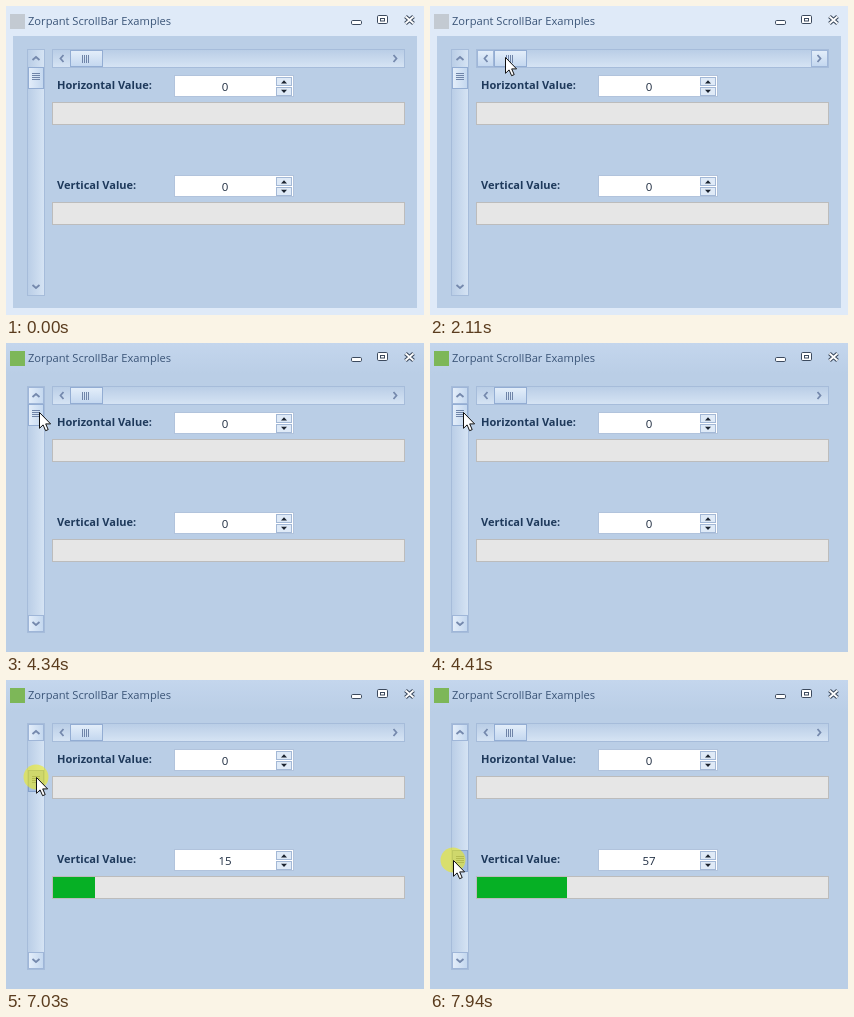
An HTML page for the animation above (8 s loop, 418x309 px).

```html
<!DOCTYPE html>
<html lang="en">
<head>
<meta charset="utf-8">
<title>ScrollBar Examples</title>
<style>
  html, body { margin: 0; width: 100%; height: 100%; overflow: hidden; background: #bacee6; }
  svg { display: block; width: 418px; height: 309px; font-family: "Open Sans", "Noto Sans", sans-serif; }
  .title { font-size: 11.15px; fill: #3b5578; }
  .label { font-size: 11.05px; font-weight: 700; fill: #1e395b; }
  .value { font-size: 11.5px; fill: #1e2c40; text-anchor: middle; }
  .chevron { fill: none; stroke: #7589ad; stroke-width: 1.8; }
  .button { stroke: #9fb6d8; visibility: hidden; }
  .hover .button { visibility: visible; }
  .thumb { stroke: #93add3; }
  .grip { stroke: #6f84a8; fill: none; }
  .track { stroke: #a6bcda; }
  .bar { fill: #e6e6e6; stroke: #bcbcbc; }
  .fill { fill: #06b025; }
  .logo { fill: #c3cad2; }
  .active .logo { fill: #7db758; }
  .frame { fill: #dfeaf8; }
  .active .frame { fill: url(#caption); }
  .crisp { shape-rendering: crispEdges; }
  .pressed .thumb { fill: #a5bfe1; stroke: #86a2cb; }
</style>
</head>
<body>
<svg id="stage" viewBox="0 0 418 309">
  <defs>
    <linearGradient id="caption" x2="0" y2="1">
      <stop stop-color="#c4d6ed"/><stop offset=".1" stop-color="#bacee6"/>
    </linearGradient>
    <linearGradient id="trackH" x2="0" y2="1">
      <stop stop-color="#b9cde6"/><stop offset="1" stop-color="#d6e4f4"/>
    </linearGradient>
    <linearGradient id="trackV">
      <stop stop-color="#b9cde6"/><stop offset="1" stop-color="#d6e4f4"/>
    </linearGradient>
    <linearGradient id="knobH" x2="0" y2="1">
      <stop stop-color="#e4eefa"/><stop offset="1" stop-color="#c3d7ef"/>
    </linearGradient>
    <linearGradient id="knobV">
      <stop stop-color="#e4eefa"/><stop offset="1" stop-color="#c3d7ef"/>
    </linearGradient>
    <g id="spin">
      <path class="crisp" d="M168.5 69.5h119v21h-119z" fill="#fff" stroke="#b1c3dc"/>
      <path class="crisp" d="M270.5 71.5h15v8h-15zM270.5 81.5h15v8h-15z" fill="#dfeaf7" stroke="#a3b8d6"/>
      <path d="M275 77.5h6l-3-3.2zM275 83.8h6l-3 3.2z" fill="#1c2430"/>
    </g>
  </defs>

  <rect class="frame" width="418" height="309"/>
  <rect x="7" y="30" width="404" height="272" fill="#bacee6"/>
  <rect class="logo" x="4" y="8" width="15" height="15"/>
  <text class="title" x="22" y="19">Zorpant ScrollBar Examples</text>

  <g fill="#fff" stroke="#3c4a5e">
    <rect x="345.5" y="14.5" width="10" height="4" rx="1.2"/>
    <rect x="371.5" y="9.5" width="10" height="8" rx="1.2"/>
    <rect x="374.5" y="12.5" width="4" height="2.5"/>
    <path d="M399.5 10.5l8 7m0-7l-8 7" stroke-width="4"/>
    <path d="M399.5 10.5l8 7m0-7l-8 7" stroke="#fff" stroke-width="1.8"/>
  </g>

  <g id="horizontal">
    <g class="crisp">
      <rect class="track" x="46.5" y="43.5" width="352" height="18" fill="url(#trackH)"/>
      <path class="button" d="M47.5 44.5h16v16h-16zM381.5 44.5h16v16h-16z" fill="url(#knobH)"/>
      <rect class="thumb" x="64.5" y="44.5" width="32" height="16" rx="1" fill="url(#knobH)"/>
      <path class="grip" d="M76.5 49v8m2-8v8m2-8v8m2-8v8"/>
    </g>
    <path class="chevron" d="M57.5 49l-3 3.5 3 3.5M387.5 49l3 3.5-3 3.5"/>
  </g>

  <g id="vertical">
    <g class="crisp">
      <rect class="track" x="21.5" y="43.5" width="17" height="246" fill="url(#trackV)"/>
      <path class="button" d="M22.5 44.5h15v16h-15zM22.5 272.5h15v16h-15z" fill="url(#knobV)"/>
      <g id="thumb">
        <rect class="thumb" x="22.5" y="61.5" width="15" height="21" rx="1" fill="url(#knobV)"/>
        <path class="grip" d="M26 67.5h8m-8 2h8m-8 2h8m-8 2h8"/>
      </g>
    </g>
    <path class="chevron" d="M26.5 54l3.5-3 3.5 3M26.5 279l3.5 3 3.5-3"/>
  </g>

  <text class="label" x="51" y="83">Horizontal Value:</text>
  <text class="label" x="51" y="183">Vertical Value:</text>
  <use href="#spin"/>
  <use href="#spin" y="100"/>
  <text class="value" x="219" y="85">0</text>
  <text class="value" id="value" x="219" y="185">0</text>
  <g class="crisp">
    <path class="bar" d="M46.5 96.5h352v22h-352zM46.5 196.5h352v22h-352z"/>
    <rect class="fill" id="fill" x="47" y="197" width="0" height="21"/>
  </g>

  <g id="cursor">
    <circle id="halo" r="12.5" fill="#f5f000" opacity=".52"/>
    <path d="M.5.5v15.8l3.6-3.4 2.5 5.8 2.6-1.1-2.5-5.7h4.9z" fill="#fff" stroke="#111"/>
  </g>
</svg>
<script>
  const $ = id => document.getElementById(id);
  const LOOP = 8000, STEP = 70, ACTIVATE = 4340, PRESS = 6610;

  // time, pointer x, pointer y, vertical value
  const path = [
    [330, 392, 306, 0], [1030, 125, 52, 0], [1100, 110, 46, 0], [1240, 92, 41, 0],
    [1380, 80, 49, 0], [2040, 80, 49, 0], [2670, 33, 69, 0], [6540, 33, 69, 0],
    [PRESS, 33, 71, 1], [7380, 28, 119, 26], [7590, 28, 119, 26], [7940, 23, 180, 57]
  ];

  function sample(t) {
    const i = path.findIndex(p => p[0] > t);
    if (i < 0) return path[path.length - 1];
    if (i === 0) return path[0];
    const a = path[i - 1], b = path[i], k = (t - a[0]) / (b[0] - a[0]);
    return a.map((v, j) => Math.round(v + (b[j] - v) * k));
  }

  // The picture advances in steps, restarting with each burst of movement.
  function snap(t) {
    const base = t < 2110 ? 330 : t < PRESS ? 2110 : PRESS;
    return base + Math.floor((t - base) / STEP) * STEP;
  }

  function draw(t) {
    const time = snap(t), [, x, y, value] = sample(time);
    const shown = t >= 330, pressed = t >= PRESS;
    const inside = (l, top, r, b) => shown && x >= l && x < r && y >= top && y < b;

    $("cursor").setAttribute("visibility", shown ? "visible" : "hidden");
    $("cursor").setAttribute("transform", `translate(${x} ${y})`);
    $("halo").setAttribute("opacity", pressed ? .52 : 0);
    $("stage").classList.toggle("active", t >= ACTIVATE);
    $("horizontal").classList.toggle("hover", inside(46, 43, 399, 62));
    $("vertical").classList.toggle("hover", inside(21, 43, 39, 290));
    $("vertical").classList.toggle("pressed", pressed);
    $("thumb").setAttribute("transform", `translate(0 ${Math.round(value * 1.92)})`);
    $("value").textContent = value;

    // The progress fill trails the value and stalls at 26.
    const filled = Math.min(26, sample(time - STEP)[3]);
    $("fill").setAttribute("width", Math.round(filled * 3.47));
  }

  const start = performance.now();
  function tick() {
    draw((performance.now() - start) % LOOP);
    requestAnimationFrame(tick);
  }
  tick();
</script>
</body>
</html>
```
